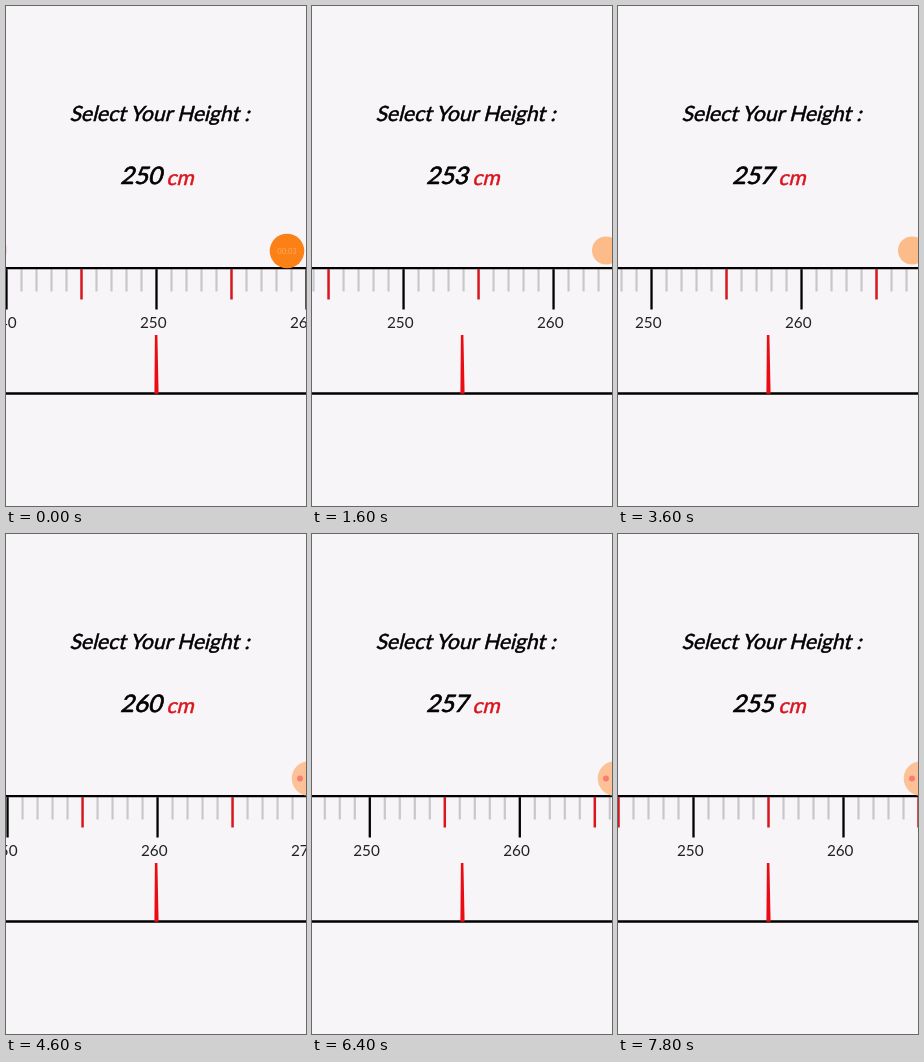
An HTML page that plays this animation: 300x500 px, repeating every 8000 ms.

```html
<!DOCTYPE html>
<html lang="en">
<head>
<meta charset="utf-8">
<title>Height ruler</title>
<style>
  html, body { margin: 0; width: 100%; height: 100%; overflow: hidden; background: #f7f5f8; }
  svg { display: block; width: 100%; height: 100%; }
  text { font-family: Lato, "Open Sans", sans-serif; }
  .head { stroke: #000; stroke-width: .5; }
</style>
</head>
<body>
<svg viewBox="0 0 300 500">
  <rect width="300" height="500" fill="#f7f5f8"/>
  <!-- Upright letters slanted by 14 degrees -->
  <text class="head" transform="translate(63.5 115) skewX(-14)" font-size="21">Select Your Height :</text>
  <text class="head" transform="translate(114 177.5) skewX(-14)" font-size="24" id="value" style="stroke-width:.7"></text>
  <text class="head" transform="translate(160.3 178.5) skewX(-14)" font-size="21" style="fill:#dc141c;stroke:#dc141c">cm</text>

  <g id="ruler"></g>
  <path d="M0 262.1H300" stroke="#000" stroke-width="2.3"/>
  <path d="M0 387.4H300" stroke="#000" stroke-width="2.5"/>
  <path d="M148.9 329H151.4L152.6 387.8H148.4Z" fill="#ea0c14"/>

  <g id="active">
    <circle cx="281" cy="245" r="17.3" fill="#fb8116"/>
    <text x="281" y="248" font-size="7.5" text-anchor="middle" fill="#ffa95c">00:03</text>
    <ellipse cx="-.5" cy="244" rx="1.5" ry="6" fill="#f8cfd2"/>
  </g>
  <circle id="idle" cx="294" cy="244.5" r="14" fill="#fcbc8a"/>
  <g id="docked">
    <circle cx="303" cy="244.5" r="17.3" fill="#fcc197"/>
    <circle cx="294" cy="244.5" r="3" fill="#fb7d72"/>
  </g>
</svg>
<script>
const LOOP = 8000, STEP = 200, UNIT = 15, CENTER = 150.5, TURN = 4200;
const NS = 'http://www.w3.org/2000/svg';
const $ = id => document.getElementById(id);

// Drag path: [time in ms, ruler value under the pointer]
const keys = [
  [0, 250], [1600, 253.93], [2600, 255.3], [2800, 255.3], [3000, 255.38],
  [TURN, 260], [4600, 259.93], [5600, 257.8], [6400, 256.18], [7800, 255], [LOOP, 254.85]
];

const slope = i => (keys[i + 1][1] - keys[i][1]) / (keys[i + 1][0] - keys[i][0]);
const tangents = keys.map((_, i) => {
  if (i === 0) return slope(0);
  if (i === keys.length - 1) return slope(i - 1);
  const a = slope(i - 1), b = slope(i);
  return a * b > 0 ? 2 * a * b / (a + b) : 0;
});

// Monotone cubic through the keys
function valueAt(t) {
  let i = 0;
  while (i < keys.length - 2 && t >= keys[i + 1][0]) i++;
  const [t0, v0] = keys[i], [t1, v1] = keys[i + 1];
  const h = t1 - t0, u = (t - t0) / h, w = 1 - u;
  return v0 * (1 + 2 * u) * w * w + v1 * (3 - 2 * u) * u * u
    + h * u * w * (tangents[i] * w - tangents[i + 1] * u);
}

function add(tag, attrs, text = '') {
  const el = document.createElementNS(NS, tag);
  for (const k in attrs) el.setAttribute(k, attrs[k]);
  el.textContent = text;
  $('ruler').append(el);
}

for (let n = 235; n <= 275; n++) {
  const x = (n - 250) * UNIT;
  const [end, stroke, width] = n % 10 === 0 ? [303.5, '#000', 2.3]
    : n % 5 === 0 ? [293.5, '#d8161f', 2.5] : [285.5, '#c9c7ca', 2.2];
  add('path', { d: `M${x} 263.2V${end}`, stroke, 'stroke-width': width });
  if (n % 10 === 0) {
    add('text', { x: x - 3.3, y: 322.3, 'font-size': 15.3, 'text-anchor': 'middle', fill: '#222' }, n);
  }
}

const show = (id, on) => $(id).setAttribute('visibility', on ? 'visible' : 'hidden');

function render(time) {
  const t = Math.floor(time % LOOP / STEP) * STEP;
  const v = valueAt(t);
  $('ruler').setAttribute('transform', `translate(${CENTER + (250 - v) * UNIT} 0)`);
  $('value').textContent = t < TURN ? Math.floor(v + .02) : Math.ceil(v - .02);
  show('active', t < 800);
  show('idle', t >= 800 && t < 3800);
  show('docked', t >= 3800);
}

const start = performance.now();
function tick() {
  render(performance.now() - start);
  requestAnimationFrame(tick);
}
tick();
</script>
</body>
</html>
```
